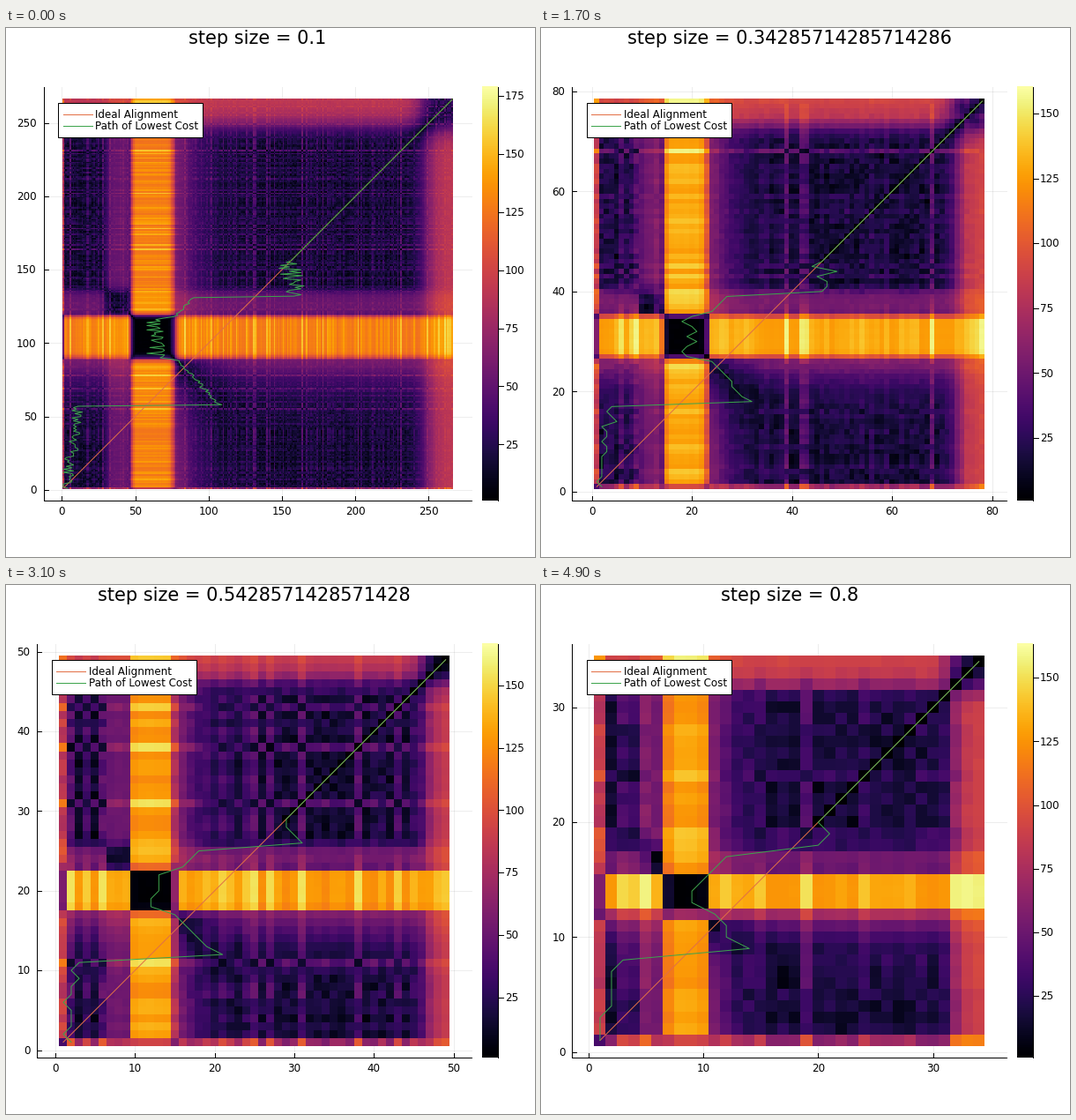
Recreate the animation shown at these times as a matplotlib script. Size 600 by 600 pixels, loop 5000 ms.

```python
import matplotlib.pyplot as plt
import numpy as np
from matplotlib.animation import FuncAnimation
from matplotlib.patches import Rectangle

plt.rcParams["font.family"] = "DejaVu Sans"

FRAMES, INTERVAL = 50, 100
TOP, BOTTOM, RIGHT = 67.0, 536.3, 528.3
SIDE = (BOTTOM - TOP) / 1.06
DURATION, MIRROR = 26.55, 16.4
PAUSE_START, PAUSE_END = 4.62, 7.62
ORANGE, GREEN = "#e26f46", "#3da44d"
SMALL, LARGE, HAIR = 8.57, 15, 0.72


def rise(t, center, width):
    return 1 / (1 + np.exp(-(t - center) / width))


def make_signal(seed):
    """Feature vectors, one row per 0.1 s; the seed only sets the fine texture."""
    rng = np.random.default_rng(seed)
    t = np.arange(268) * 0.1
    silence = rise(t, PAUSE_START, 0.08) * (1 - rise(t, PAUSE_END, 0.12))
    speech = 1 - 0.93 * silence
    voice = speech * np.minimum(rng.gamma(1.0, 12, t.size), 42)
    detail = speech * rng.normal(0, 6.5, (3, t.size))
    ending = rise(t, 24.6, 0.45)
    level = 124 * silence - 0.6 * voice + 12 * ending
    before = 50 * rise(t, 2.9, 0.15) * (1 - rise(t, PAUSE_START, 0.1))
    after = 68 * rise(t, PAUSE_END, 0.12) * np.exp(-np.maximum(t - PAUSE_END, 0) / 1.9)
    return np.column_stack([level, voice, before, after, 88 * ending, *detail])


SIGNAL, REVERSED = make_signal(11), make_signal(5)


def sample(signal, times):
    return signal[np.rint(times / 0.1).astype(int)]


def distances(times, seam):
    across = sample(SIGNAL, times)
    upward = np.where((times < seam)[:, None],
                      sample(REVERSED, np.abs(MIRROR - times)), across)
    # Each recording fades in, so its first sample is nearly silent.
    across[0], upward[0] = 0, 0
    across[0, :2] = 72, -25
    upward[0, :2] = 40, -40
    return np.sqrt(sum((upward[:, None, k] - across[None, :, k]) ** 2
                       for k in range(across.shape[1])))


def lowest_path(times, step, seam, seed):
    jitter = np.random.default_rng(seed).uniform(-1, 1, times.size)
    matched = np.select(
        [times >= seam, times < 5.65, times < 8.9, times < 11.7, times < 13.1],
        [times,
         0.2 + 0.15 * times + 0.4 * jitter,
         MIRROR - times + 0.2 * jitter,
         6.3 + 0.6 * jitter,
         times - 4.1 + 0.15 * jitter],
        15.6 + 0.9 * jitter)
    return np.rint(np.maximum(matched, 0) / step) + 1


def tick_step(count):
    if 1.03 * count + 0.5 >= 150:
        return 50
    return 20 if count >= 68 else 10


fig = plt.figure(figsize=(6, 6), dpi=100, facecolor="white")
ax = fig.add_axes([0, 0, 1, 1])


def line(xs, ys, color="black", **style):
    ax.plot(xs, ys, color=color, lw=HAIR, solid_joinstyle="round", **style)


def label(x, y, text, align="left", size=SMALL):
    ax.text(x, y, text, ha=align, va="baseline", fontsize=size, zorder=6)


def draw_axes(left, count, to_x, to_y):
    line([left, left, RIGHT], [TOP, BOTTOM, BOTTOM], zorder=4)
    for value in range(0, 2 * count, tick_step(count)):
        x, y = to_x(value), to_y(value)
        if x <= RIGHT:
            line([x, x], [TOP, BOTTOM], alpha=0.07, zorder=0)
            line([x, x], [BOTTOM, BOTTOM - 5], zorder=4)
            label(x, 552.5, str(value), "center")
        if y >= TOP:
            line([left, RIGHT], [y, y], alpha=0.07, zorder=0)
            line([left, left + 5], [y, y], zorder=4)
            label(left - 8, y + 4.3, str(value), "right")


def draw_colorbar(low, high):
    ax.imshow(np.linspace(0, 1, 256)[:, None], cmap="inferno", origin="lower",
              extent=(540, 558, BOTTOM, TOP), aspect="auto", zorder=1)
    line([558, 558], [TOP, BOTTOM], zorder=4)
    for value in range(25, int(high) + 1, 25):
        y = BOTTOM - (value - low) / (high - low) * (BOTTOM - TOP)
        line([558, 563.5], [y, y], zorder=4)
        label(566, y + 4.3, str(value))


def draw_legend(left):
    ax.add_patch(Rectangle((left + 16.5, 85), 164, 38.5, fc="white",
                           ec="black", lw=HAIR, zorder=5))
    entries = [(98, ORANGE, "Ideal Alignment"), (111, GREEN, "Path of Lowest Cost")]
    for y, color, text in entries:
        line([left + 22, left + 55], [y, y], color, zorder=6)
        label(left + 58.5, y + 4.3, text)


def draw(i):
    ax.clear()
    ax.axis("off")
    step = (7 + i) / 70
    count = int(DURATION / step + 1e-9) + 1
    times = np.arange(count) * step
    seam = 15.5 - 0.9 * (step - 0.1)
    low, high = 0.7, np.interp(i, [0, 17, 39, 49], [178.8, 160.2, 170.2, 163.2])

    # Three-digit tick labels push the axis to the right.
    left = 42.7 if 1.03 * count + 0.5 >= 100 else 35.3
    center = (left + RIGHT) / 2
    x0, y0 = center - SIDE / 2, (TOP + BOTTOM + SIDE) / 2
    scale = SIDE / count

    def to_x(value):
        return x0 + (value - 0.5) * scale

    def to_y(value):
        return y0 - (value - 0.5) * scale

    ax.imshow(distances(times, seam), cmap="inferno", vmin=low, vmax=high,
              origin="lower", extent=(x0, x0 + SIDE, y0, y0 - SIDE),
              interpolation="nearest", aspect="auto", zorder=1)
    index = np.arange(1, count + 1)
    line(to_x(index), to_y(index), ORANGE, zorder=2)
    line(to_x(lowest_path(times, step, seam, i)), to_y(index), GREEN, zorder=3)

    draw_axes(left, count, to_x, to_y)
    draw_colorbar(low, high)
    draw_legend(left)
    label(center, 18, f"step size = {step}", "center", LARGE)
    ax.set_xlim(0, 600)
    ax.set_ylim(600, 0)
    return []


animation = FuncAnimation(fig, draw, frames=FRAMES, interval=INTERVAL,
                          init_func=lambda: [], repeat=True, repeat_delay=0)
plt.show()
```
